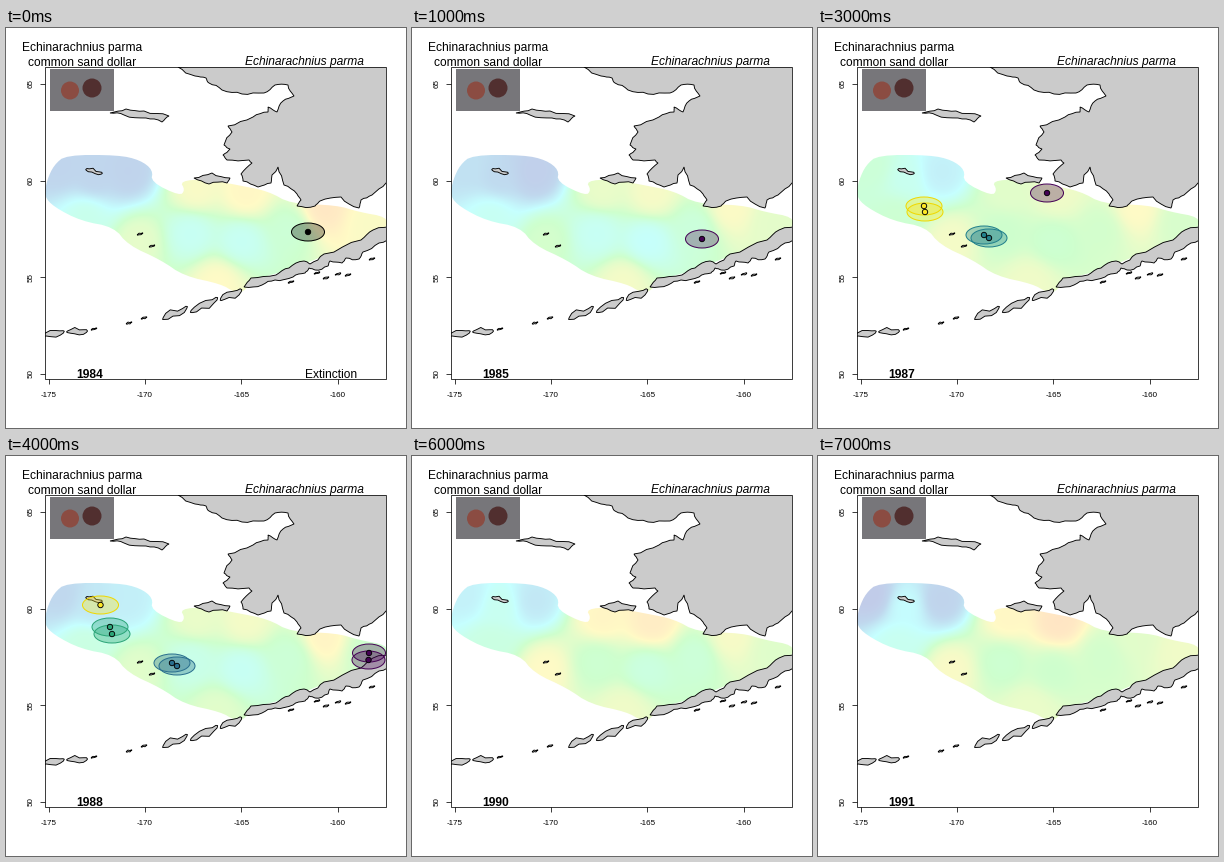
A matplotlib script that plays this animation: 400x400 px, repeating every 8000 ms.

```python
import numpy as np
import matplotlib.pyplot as plt
from matplotlib.animation import FuncAnimation
from matplotlib.colors import LinearSegmentedColormap
from matplotlib.patches import Circle, Ellipse, Polygon, Rectangle

SIZE, DPI = 400, 100
PX = 72 / DPI
LEFT, TOP, RIGHT, BOTTOM = 39, 39, 380, 351

plt.rcParams["font.family"] = "Liberation Sans"
fig = plt.figure(figsize=(SIZE / DPI, SIZE / DPI), dpi=DPI, facecolor="white")
ax = fig.add_axes([0, 0, 1, 1])
ax.set_axis_off()
rng = np.random.default_rng(4)

# Coasts: main corners only, roughened below
MAINLAND = [
    (172, 39), (189, 48), (200, 50), (203, 55), (216, 62), (236, 66),
    (258, 65), (269, 57), (282, 57), (288, 68), (277, 73), (271, 84),
    (262, 79), (262, 84), (247, 89), (222, 98), (226, 104), (218, 117),
    (224, 121), (217, 127), (221, 132), (243, 132), (246, 135), (235, 146),
    (237, 153), (252, 159), (265, 155), (266, 147), (272, 139), (278, 157),
    (291, 166), (295, 172), (291, 178), (309, 178), (314, 173), (335, 169),
    (353, 180), (355, 172), (366, 167), (380, 155), (390, 150), (390, 30),
]
PENINSULA = [
    (390, 197), (367, 202), (355, 212), (318, 226), (304, 236), (298, 233),
    (283, 240), (270, 247), (245, 250), (238, 259), (256, 257), (269, 252),
    (287, 249), (299, 245), (303, 240), (309, 242), (322, 238), (324, 233),
    (336, 235), (340, 230), (353, 231), (357, 224), (373, 215), (390, 210),
]
ST_LAWRENCE = [(104, 85), (120, 81), (138, 83), (163, 88), (156, 94),
               (140, 90), (118, 87)]
NUNIVAK = [(188, 150), (206, 145), (224, 150), (221, 155), (203, 156)]
# Long islands: centre, length, tilt
LONG_ISLES = [(198, 277, 31, -24), (169, 285, 28, -23), (225, 267, 24, -22),
              (71, 303.5, 21, 2), (47, 305.5, 23, -7), (88, 143.5, 17, 18)]
ISLETS = [(134, 206), (146, 218), (138, 290), (123, 295), (88, 301), (285, 254),
          (311, 245), (320, 250), (332, 246), (342, 247), (366, 231)]
SEA = [
    (38, 168), (41, 152), (48, 137), (60, 127), (112, 127), (134, 132),
    (147, 142), (145, 154), (174, 168), (179, 162), (174, 153), (200, 151),
    (231, 157), (262, 163), (285, 176), (330, 177), (353, 184), (381, 189),
    (381, 200), (357, 212), (318, 228), (283, 242), (246, 252), (238, 264),
    (228, 264), (215, 256), (178, 248), (155, 232), (122, 217), (108, 199),
    (75, 193), (48, 179),
]

# Sea temperature: sample places, and a level for each place by year
SITES = np.array([
    (55, 140), (88, 150), (122, 145), (80, 188), (133, 212), (190, 163), (240, 167),
    (185, 205), (235, 213), (212, 253), (285, 200), (317, 182), (362, 195),
])
LEVELS = {
    1984: [.9, .9, .8, 2.4, 3.5, 3.9, 4.1, 2.2, 2.2, 4, 2.8, 4.6, 3.9],
    1986: [1.6, 1.2, .4, 2.1, 2.8, 3.3, 3.6, 2.2, 1.9, 3.6, 2.6, 3.3, 3],
    1987: [2.8, 2.3, 1.6, 2.9, 3.8, 3.4, 3.7, 3, 2.9, 3.7, 3.1, 4, 3.2],
    1988: [1, 1.4, 1.6, 2.6, 3.4, 3.6, 3.8, 2.4, 2.2, 3.4, 2.8, 4.2, 3],
    1989: [2.9, 2.6, 2, 2.9, 4.1, 4.2, 4.2, 2.9, 2.2, 3.8, 2.4, 4.3, 3],
    1991: [.4, 2, .8, 2.3, 3.9, 4.1, 4.7, 2.9, 3, 3.6, 3.1, 3.4, 3.7],
}
PALETTE = LinearSegmentedColormap.from_list(
    "sea", ["#c3c3e6", "#c0d8ee", "#c6ffff", "#ceffce", "#fffac6", "#ffdcc4"])

INK, PLUM, BLUE = "#000000", "#440154", "#2a6f8e"
TEAL, GREEN, GOLD = "#21808c", "#2ca578", "#fde725"
CORES = {
    1984: [(302, 204, INK)],
    1985: [(290, 211, PLUM)],
    1986: [(89.5, 158.5, GOLD), (278, 216, PLUM), (278, 222.5, PLUM)],
    1987: [(229, 165, PLUM), (166, 207, TEAL), (171, 210, TEAL),
           (106, 178, GOLD), (107, 184, GOLD)],
    1988: [(94.5, 149, GOLD), (104, 171, GREEN), (106, 178, GREEN),
           (166, 207, BLUE), (171, 210, BLUE), (363, 197, PLUM), (362.5, 204, PLUM)],
    1989: [(290, 210, PLUM), (290, 216.5, PLUM), (290, 222.5, PLUM)],
}
EVENTS = {1984: "Extinction", 1986: "Colonization"}
YEARS = range(1984, 1992)


def roughen(points, amount=.1, rounds=2):
    """Shift the middle of every side a little to the left or right."""
    pts = np.array(points, float)
    for _ in range(rounds):
        side = np.roll(pts, -1, axis=0) - pts
        normal = np.column_stack([-side[:, 1], side[:, 0]])
        shift = rng.uniform(-amount, amount, (len(pts), 1))
        middle = pts + side / 2 + normal * shift
        straight = np.hypot(*side.T) > 25
        middle[straight] = (pts + side / 2)[straight]
        pts = np.stack([pts, middle], axis=1).reshape(-1, 2)
    return pts


def smooth(points, rounds=2):
    pts = np.array(points, float)
    for _ in range(rounds):
        after = np.roll(pts, -1, axis=0)
        pts = np.stack([.75 * pts + .25 * after, .25 * pts + .75 * after],
                       axis=1).reshape(-1, 2)
    return pts


def isle(x, y, length, tilt):
    t = np.linspace(0, 2 * np.pi, 14, endpoint=False)
    u = length / 2 * np.cos(t)
    v = length * .12 * np.sin(t) * rng.uniform(.5, 1.4, len(t))
    v += length * .04 * np.sin(u / length * 9)
    a = np.radians(tilt)
    return np.column_stack([x + u * np.cos(a) - v * np.sin(a),
                            y + u * np.sin(a) + v * np.cos(a)])


def levels(year):
    if year in LEVELS:
        return np.array(LEVELS[year])
    return (levels(year - 1) + levels(year + 1)) / 2


gx, gy = np.meshgrid(np.arange(LEFT, RIGHT, 2) + 1, np.arange(121, 271, 2) + 1)
dist = (gx[..., None] - SITES[:, 0]) ** 2 + (gy[..., None] - SITES[:, 1]) ** 2
weight = 1 / (dist + 200) ** 2
weight /= weight.sum(axis=-1, keepdims=True)
FIELDS = [weight @ levels(year) for year in YEARS]


def label(x, y, text, size=12, **style):
    style.setdefault("ha", "center")
    return ax.text(x, y, text, fontsize=size * PX, va="baseline", zorder=8, **style)


def line(xs, ys):
    ax.plot(xs, ys, color="black", lw=.75 * PX, zorder=6, solid_capstyle="butt")


frame_box = Rectangle((LEFT, TOP), RIGHT - LEFT, BOTTOM - TOP, fill=False,
                      ec="black", lw=.75 * PX, zorder=6)
sea = ax.imshow(FIELDS[0], cmap=PALETTE, vmin=0, vmax=5, interpolation="bilinear",
                extent=(LEFT, LEFT + 2 * gx.shape[1], 121 + 2 * gx.shape[0], 121),
                aspect="auto", zorder=1)
ax.set(xlim=(0, SIZE), ylim=(SIZE, 0))
sea.set_clip_path(Polygon(smooth(SEA), transform=ax.transData))
ax.add_patch(frame_box)


def add(patch):
    ax.add_patch(patch)
    patch.set_clip_path(frame_box)
    return patch


land = [roughen(coast) for coast in (MAINLAND, PENINSULA, ST_LAWRENCE, NUNIVAK)]
land += [isle(*place) for place in LONG_ISLES]
land += [isle(x, y, 6, -15) for x, y in ISLETS]
for shape in land:
    add(Polygon(shape, fc="#cbcbcb", ec="black", lw=.9 * PX, zorder=2))

for i, lon in enumerate(range(-175, -155, 5)):
    x = 42.5 + 96.4 * i
    line([x, x], [BOTTOM, BOTTOM + 5])
    label(x, 369, str(lon), 8)
for i, lat in enumerate(range(50, 70, 5)):
    y = 345.5 - 96.5 * i
    line([LEFT - 5, LEFT], [y, y])
    ax.text(25, y, str(lat), fontsize=8 * PX, rotation=90, ha="center", va="center")

# Inset picture of two sand dollars
ax.add_patch(Rectangle((44, 41), 64, 42, fc="#77767a", ec="none", zorder=7))
ax.add_patch(Circle((64, 62.5), 9, fc="#8b4c42", ec="none", zorder=7))
ax.add_patch(Circle((86, 60), 9.5, fc="#512f2f", ec="none", zorder=7))

label(76, 23, "Echinarachnius parma")
label(76, 37.5, "common sand dollar")
label(298, 37, "Echinarachnius parma", style="italic")
year_text = label(84, 350, "", weight="bold")
event_text = label(351.5, 350, "", ha="right")
marks = []


def core(x, y, color):
    edge = "#f0d800" if color == GOLD else color
    width = 33 if color in (INK, PLUM) else 36
    shade = .3 if color in (INK, PLUM) else .35
    return [
        add(Ellipse((x, y), width, 18, fc=color, ec="none", alpha=shade, zorder=3)),
        add(Ellipse((x, y), width, 18, fill=False, ec=edge, lw=PX, zorder=4)),
        add(Circle((x, y), 2.7, fc=color, ec="black", lw=.9 * PX, zorder=5)),
    ]


def update(i):
    year = YEARS[i]
    sea.set_data(FIELDS[i])
    year_text.set_text(str(year))
    event_text.set_text(EVENTS.get(year, ""))
    while marks:
        marks.pop().remove()
    for spot in CORES.get(year, []):
        marks.extend(core(*spot))
    return [sea, year_text, event_text, *marks]


anim = FuncAnimation(fig, update, frames=len(YEARS), interval=1000,
                     repeat=True, repeat_delay=0, blit=False)
plt.show()
```
